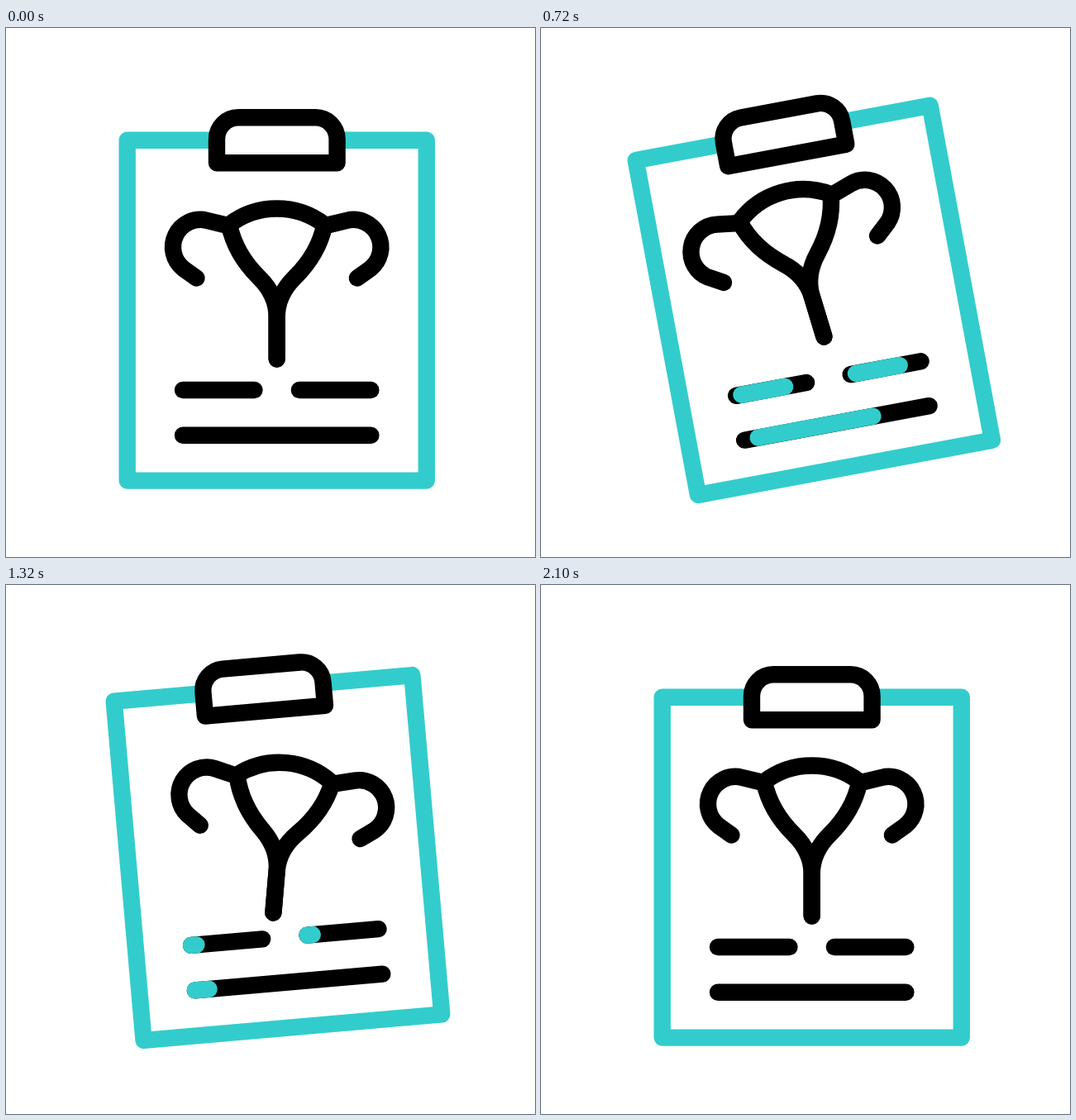
Animation of 640x640 px, one loop 2400 ms. Source, as an HTML page with a canvas:

```html
<!DOCTYPE html>
<html lang="en">
<head>
<meta charset="utf-8">
<title>Clipboard</title>
<style>
  html, body { margin: 0; width: 100%; height: 100%; overflow: hidden; background: #fff; }
  canvas { display: block; width: 640px; height: 640px; }
</style>
</head>
<body>
<canvas id="stage" width="640" height="640"></canvas>
<script>
const ctx = document.getElementById('stage').getContext('2d');
const LOOP = 2400, STEP = 20;
const TEAL = '#33cccc', INK = '#000';
const WIDTH = 20.4;
const CX = 327.7;            // shared symmetry axis
const LEFT = 214, RIGHT = 2 * CX - LEFT, GAP = 27.2;
const LAG = 140;             // the organ follows the board
const SPANS = [400, 360, 320, 240, 200];   // each swing is quicker than the last

const clip = new Path2D('M255 163.2V134.3a26 26 0 0 1 26-26H374.6a26 26 0 0 1 26 26V163.2Z');
const dome = new Path2D('M270 238A95 95 0 0 1 385.4 238');
const half = new Path2D(
  'M270 238C275 262 287 283 306.3 302C319.5 315 327.7 331 327.7 350V400.5' +
  'M268.5 239L243 232.8A33.2 33.2 0 0 0 214.7 291.2L230.5 302.5');

const smooth = p => p * p * (3 - 2 * p);
const ramp = (t, start, span) => smooth(Math.min(1, Math.max(0, (t - start) / span)));

// Eases through peaks of alternating sign, whose size is given by peak(n)
function swing(t, start, peak) {
  let value = 0;
  SPANS.forEach((span, n) => {
    const next = (n % 2 ? 1 : -1) * peak(n);
    value += (next - value) * ramp(t, start, span);
    start += span;
  });
  return value;
}

const lift = t => swing(t, 200, n => 25 * Math.min(1, Math.max(0, (3 - n) / 2)));
const turn = t => swing(t, 280, n => 20 - 5 * n);

function posed(dy, degrees, pivotY, draw) {
  ctx.save();
  ctx.translate(CX, pivotY + dy);
  ctx.rotate(degrees * Math.PI / 180);
  ctx.translate(-CX, -pivotY);
  draw();
  ctx.restore();
}

function bar(x0, x1, y, color) {
  ctx.strokeStyle = color;
  ctx.beginPath();
  ctx.moveTo(x0, y);
  ctx.lineTo(x1, y);
  ctx.stroke();
}

// A text row with two teal sweeps passing along it
function row(t, x0, x1, y) {
  bar(x0, x1, y, INK);
  for (const start of [340, 1220]) {
    const head = ramp(t, start, 600), tail = ramp(t, start + 280, 600);
    if (head > tail) bar(x0 + (x1 - x0) * tail, x0 + (x1 - x0) * head, y, TEAL);
  }
}

function drawBoard(t) {
  ctx.strokeStyle = TEAL;
  ctx.strokeRect(146.7, 135.7, 362.1, 411.9);

  ctx.fillStyle = '#fff';
  ctx.strokeStyle = INK;
  ctx.fill(clip);
  ctx.stroke(clip);

  row(t, LEFT, CX - GAP, 438);
  row(t, CX + GAP, RIGHT, 438);
  row(t, LEFT, RIGHT, 492.7);
}

function drawOrgan() {
  ctx.strokeStyle = INK;
  ctx.stroke(dome);
  ctx.stroke(half);
  ctx.translate(2 * CX, 0);
  ctx.scale(-1, 1);
  ctx.stroke(half);
}

function render(t) {
  ctx.fillStyle = '#fff';
  ctx.fillRect(0, 0, 640, 640);
  ctx.lineCap = ctx.lineJoin = 'round';
  ctx.lineWidth = WIDTH;
  posed(lift(t), 0.56 * turn(t), 327.5, () => drawBoard(t));
  posed(lift(t - LAG), turn(t - LAG), 349.5, drawOrgan);
}

function tick() {
  const t = performance.now() % LOOP;
  render(Math.floor(t / STEP) * STEP);
  requestAnimationFrame(tick);
}
tick();
</script>
</body>
</html>
```
